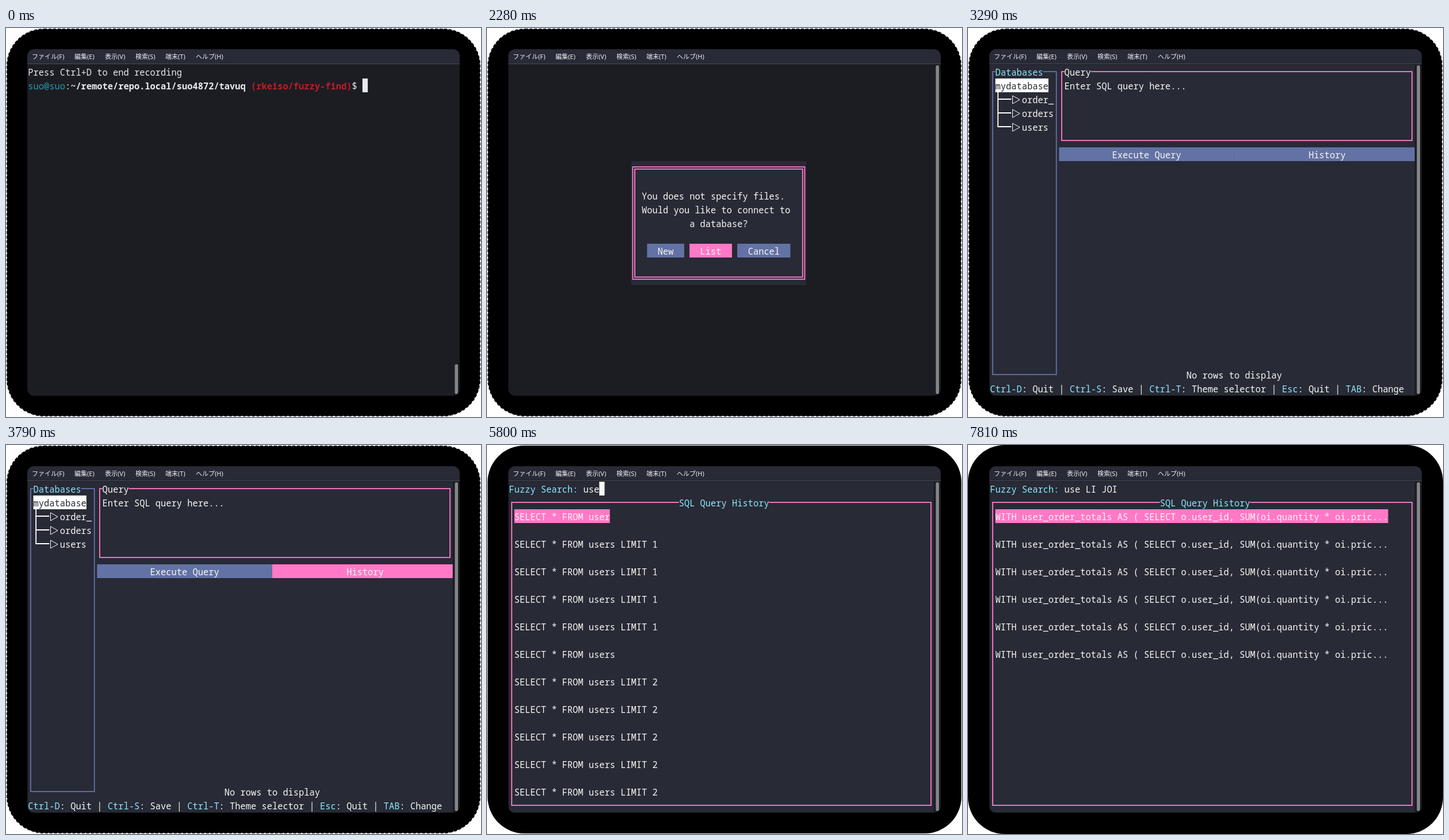
Write an HTML page with a canvas that moves like this. It is 826 px wide and 678 px high and loops after 8000 ms.

```html
<!DOCTYPE html>
<html lang="ja">
<head>
<meta charset="utf-8">
<style>
html, body { margin: 0; width: 100%; height: 100%; overflow: hidden; background: #fff; }
canvas { display: block; }
</style>
</head>
<body>
<canvas id="stage" width="826" height="678"></canvas>
<script>
const ctx = document.getElementById('stage').getContext('2d');
const LOOP = 8000, TICK = 252;
// A 10 x 26 px character grid shown at 12/13 size.
const SCALE = 12 / 13;
const LEFT = 38.3, TOP = 64, CW = 10 * SCALE, RH = 26 * SCALE, COLS = 80, ROWS = 24;
const LINE = 2 * SCALE;
const C = {
  dark: '#1c1d22', panel: '#282a36', text: '#f8f8f2', pink: '#ff79c6', blue: '#6272a4',
  cyan: '#8be9fd', select: '#44475a', white: '#ffffff', shell: '#e8e8ee', teal: '#2a98ad', red: '#c01c28'
};

const cellX = col => LEFT + col * CW;
const cellY = row => TOP + row * RH;

function fill(col, row, cols, rows, color) {
  ctx.fillStyle = color;
  ctx.fillRect(cellX(col), cellY(row), cols * CW, rows * RH);
}

// Terminal text: one glyph per grid cell.
function print(col, row, str, color = C.text, bg, bold) {
  if (bg) fill(col, row, str.length, 1, bg);
  ctx.font = `${bold ? 'bold ' : ''}15.4px "Noto Sans Mono", "DejaVu Sans Mono", monospace`;
  ctx.fillStyle = color;
  [...str].forEach((ch, i) => {
    if (ch !== ' ') ctx.fillText(ch, cellX(col + i), cellY(row) + 19);
  });
  return col + str.length;
}

// Box-drawing border running through the centres of its edge cells.
function border(c0, r0, c1, r1, color, double) {
  ctx.strokeStyle = color;
  ctx.lineWidth = LINE;
  for (const d of double ? [-LINE, LINE] : [0]) {
    const x = cellX(c0 + 0.5) + d, y = cellY(r0 + 0.5) + d;
    ctx.strokeRect(x, y, (c1 - c0) * CW - 2 * d, (r1 - r0) * RH - 2 * d);
  }
}

function button(col, row, cols, label, pad, focused) {
  fill(col, row, cols, 1, focused ? C.pink : C.blue);
  print(col + pad, row, label);
}

const cursor = (col, row, color) => fill(col, row, 1, 1, color);

function drawShell(typed, entered) {
  print(0, 0, 'Press Ctrl+D to end recording', C.shell);
  let col = print(0, 1, 'suo@suo', C.teal);
  col = print(col, 1, ':', C.shell);
  col = print(col, 1, '~/remote/repo.local/suo4872/tavuq ', C.shell, null, true);
  col = print(col, 1, '(rkeiso/fuzzy-find)', C.red, null, true);
  col = print(col, 1, '$ ' + typed, C.shell);
  cursor(entered ? 0 : col, entered ? 2 : 1, C.shell);
}

function drawDialog(focus) {
  fill(23, 7, 33, 9, C.panel);
  border(23, 7, 55, 15, C.pink, true);
  print(25, 9, 'You does not specify files.');
  print(25, 10, 'Would you like to connect to');
  print(34, 11, 'a database?');
  button(26, 13, 7, 'New', 2, focus === 0);
  button(34, 13, 8, 'List', 2, focus === 1);
  button(43, 13, 10, 'Cancel', 2, focus === 2);
}

const connections = [
  ['1', 'tablor', 'Tablor3 database=/home/suo/mydatabase.db'],
  ['2', 'vestrumb', 'Vestrumbal 127.0.0.1:15432 database=mydatabase'],
  ['3', 'ozqel', 'Ozqel 127.0.0.1:13306 database=mydatabase'],
  ['*', 'Back', 'Return to connection options']
];

function drawConnections(selected) {
  fill(0, 0, COLS, ROWS, C.panel);
  border(0, 0, 79, 23, C.pink, true);
  print(32, 0, 'Saved Connections', C.cyan, C.panel);
  connections.forEach(([key, name, info], i) => {
    const row = 1 + i * 2, on = i === selected;
    print(1, row, `(${key})`);
    print(5, row, name, on ? C.panel : C.text, on && C.select);
    print(5, row + 1, info);
  });
}

function drawTree() {
  const x = cellX(1.5);
  ctx.strokeStyle = C.white;
  ['order_', 'orders', 'users'].forEach((name, i) => {
    const row = i + 2, y = cellY(row + 0.5);
    ctx.lineWidth = LINE;
    ctx.beginPath();
    ctx.moveTo(x, y - RH / (i ? 1 : 2));
    ctx.lineTo(x, y);
    ctx.lineTo(cellX(4), y);
    ctx.stroke();
    ctx.lineWidth = 1;
    ctx.beginPath();
    ctx.moveTo(77.5, y - 6);
    ctx.lineTo(90, y + 1);
    ctx.lineTo(77.5, y + 8);
    ctx.closePath();
    ctx.stroke();
    print(6, row, name);
  });
}

const shortcuts = [['Ctrl-D', 'Quit'], ['Ctrl-S', 'Save'], ['Ctrl-T', 'Theme selector'], ['Esc', 'Quit'], ['TAB', 'Change']];

function drawMain(focus) {
  fill(0, 0, COLS, ROWS, C.panel);
  border(0, 0, 12, 22, C.blue);
  print(1, 0, 'Databases', C.cyan, C.panel);
  print(1, 1, 'mydatabase', C.panel, C.white);
  drawTree();
  border(13, 0, 79, 5, C.pink);
  print(14, 0, 'Query', C.text, C.panel);
  print(14, 1, 'Enter SQL query here...');
  button(13, 6, 33, 'Execute Query', 10, focus === 1);
  button(46, 6, 34, 'History', 14, focus === 2);
  print(37, 22, 'No rows to display');
  let col = 0;
  shortcuts.forEach(([key, action], i) => {
    if (i) col = print(col, 23, ' | ');
    col = print(col, 23, key, C.cyan);
    col = print(col, 23, ': ' + action);
  });
}

const repeat = (n, query) => Array(n).fill(query);
const queries = [
  'SELECT * FROM actor',
  'SELECT * FROM user',
  ...repeat(4, 'SELECT * FROM users LIMIT 1'),
  'SELECT * FROM users',
  ...repeat(7, 'SELECT * FROM users LIMIT 2'),
  ...repeat(6, 'WITH user_order_totals AS ( SELECT o.user_id, SUM(oi.quantity * oi.price) ' +
    'AS total FROM orders o JOIN order_items oi ON o.id = oi.order_id ) LIMIT 5')
];

function drawHistory(search, showCursor) {
  fill(0, 0, COLS, ROWS, C.panel);
  print(0, 0, 'Fuzzy Search:', C.cyan);
  const end = print(14, 0, search);
  if (showCursor) cursor(end, 0, C.text);
  border(0, 1, 79, 23, C.pink);
  print(32, 1, 'SQL Query History', C.cyan, C.panel);
  const terms = search.toLowerCase().split(' ');
  queries
    .filter(q => terms.every(term => q.toLowerCase().includes(term)))
    .slice(0, 11)
    .forEach((q, i) => {
      const label = q.length > 74 ? q.slice(0, 71) + '...' : q;
      print(1, 2 + i * 2, label, C.text, i === 0 && C.pink);
    });
}

function roundRect(x, y, w, h, r) {
  ctx.beginPath();
  ctx.roundRect(x, y, w, h, r);
}

function drawBackdrop(inset) {
  ctx.fillStyle = C.white;
  ctx.fillRect(0, 0, 826, 678);
  ctx.fillStyle = ctx.strokeStyle = '#000';
  roundRect(inset, inset, 826 - 2 * inset, 678 - 2 * inset, 64);
  ctx.fill();
  if (inset > 1) {
    ctx.lineWidth = 2;
    ctx.setLineDash([5, 3]);
    ctx.stroke();
    ctx.setLineDash([]);
  }
}

const menu = [[45, 'ファイル(F)'], [119, '編集(E)'], [172, '表示(V)'], [225, '検索(S)'], [277, '端末(T)'], [330, 'ヘルプ(H)']];

function drawMenu() {
  ctx.fillStyle = C.panel;
  ctx.fillRect(37, 37, 752, 25);
  ctx.fillStyle = '#484a52';
  ctx.fillRect(37, 62, 752, 1);
  ctx.fillStyle = '#f0f0f2';
  ctx.font = '11px "Noto Sans", "Noto Sans CJK JP", sans-serif';
  menu.forEach(([x, label]) => ctx.fillText(label, x, 54));
}

function drawScreen(tick) {
  if (tick < 7) drawShell('tavuq'.slice(0, tick), tick === 6);
  else if (tick < 10) drawDialog(tick === 9 ? 1 : 0);
  else if (tick < 13) drawConnections(Math.min(tick - 10, 1));
  else if (tick < 16) drawMain(tick - 13);
  else drawHistory('use LI JOI'.slice(0, Math.max(0, tick - 20)), ![19, 20, 31].includes(tick));
}

function draw(now) {
  const tick = Math.min(31, Math.floor((now % LOOP + 15) / TICK));
  drawBackdrop(tick < 21 ? 2 : tick < 28 ? 1 : 0);
  ctx.save();
  roundRect(37, 37, 752, 604, 12);
  ctx.clip();
  ctx.fillStyle = C.dark;
  ctx.fillRect(37, 37, 752, 604);
  drawMenu();
  drawScreen(tick);
  const thumbTop = tick < 7 ? 586 : 65;
  ctx.fillStyle = '#85868a';
  roundRect(780.5, thumbTop, 5.5, 638 - thumbTop, 2.75);
  ctx.fill();
  ctx.restore();
}

const start = performance.now();
function loop() {
  draw(performance.now() - start);
  requestAnimationFrame(loop);
}
loop();
</script>
</body>
</html>
```
